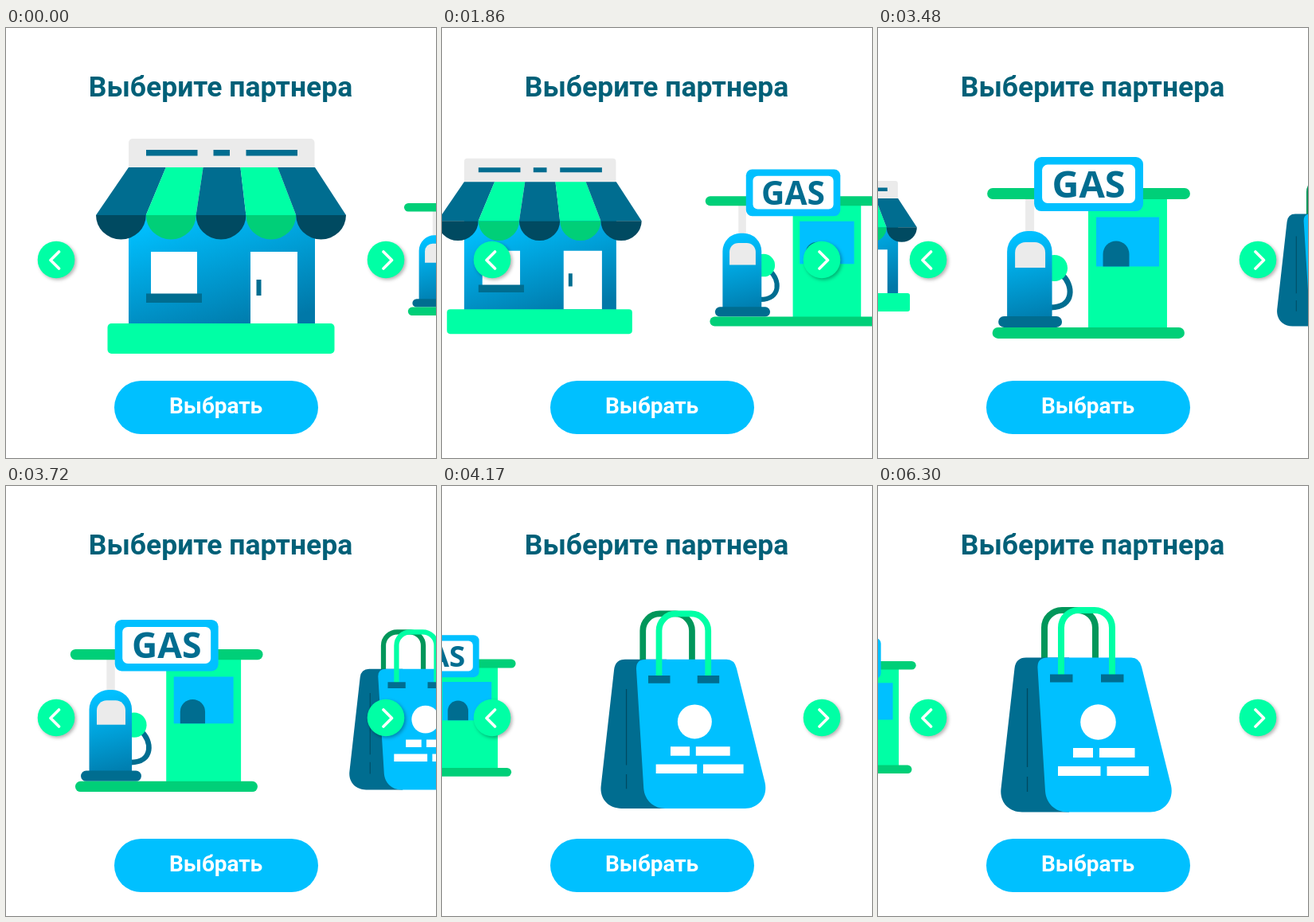
An HTML page that plays this animation: 540 by 540 pixels, repeating every 7110 ms.

```html
<!DOCTYPE html>
<html lang="ru">
<head>
<meta charset="utf-8">
<style>
  html, body { margin: 0; width: 100%; height: 100%; overflow: hidden; background: #fff; }
  svg { display: block; width: 100%; height: 100%; }
  text { text-anchor: middle; font-weight: 700; font-family: Roboto, sans-serif; }
  .blue { fill: #00c0ff; }
  .navy { fill: #006d90; }
  .deep { fill: #004a61; }
  .mint { fill: #00ffa5; }
  .leaf { fill: #00cf78; }
  .pale { fill: #ebebeb; }
  .white { fill: #fff; }
  .line { fill: none; stroke-width: 8; }
  .arrow { filter: drop-shadow(2px 2px 2px rgba(0, 0, 0, .3)); }
  .chevron { fill: none; stroke: #fff; stroke-width: 3.6; stroke-linecap: round; stroke-linejoin: round; }
</style>
</head>
<body>
<svg viewBox="0 0 540 540">
  <defs>
    <linearGradient id="wall" gradientUnits="userSpaceOnUse" x1="240" y1="225" x2="290" y2="385">
      <stop stop-color="#00c0ff"/><stop offset="1" stop-color="#0078a8"/>
    </linearGradient>
    <linearGradient id="pump" gradientUnits="userSpaceOnUse" x1="180" y1="262" x2="205" y2="372">
      <stop stop-color="#00c0ff"/><stop offset="1" stop-color="#0078a8"/>
    </linearGradient>
  </defs>

  <text x="269.5" y="86" font-size="35.5" fill="#006078">Выберите партнера</text>

  <g id="shop">
    <path class="pale" d="M154 178V144a5 5 0 0 1 5-5H382.500a5 5 0 0 1 5 5V178z"/>
    <path class="navy" d="M176 153h64.500v7.500H176zM260.500 153H281v7.500H260.500zM301.500 153H366v7.500H301.500z"/>
    <path fill="url(#wall)" d="M154 234H388V372H154z"/>
    <path class="white" d="M182 281h58v53h-58zM307 281h59v90h-59z"/>
    <path class="navy" d="M176 333.500h70V345h-70zM314.500 316h6v20h-6z"/>
    <g id="awning"></g>
    <rect class="mint" x="127.500" y="371" width="285" height="38" rx="5"/>
  </g>

  <g id="gas">
    <rect class="pale" x="185" y="210" width="11" height="50"/>
    <rect class="mint" x="264" y="208" width="99" height="170"/>
    <rect class="leaf" x="137" y="201" width="255" height="14" rx="7"/>
    <rect class="blue" x="274" y="237.500" width="79" height="62"/>
    <path class="navy" d="M282.500 299.500V284a16.500 16.500 0 0 1 33 0v15.500z"/>
    <path class="line" stroke="#006d90" style="stroke-width:7" d="M230 309C246 322 247 351 217 351"/>
    <circle class="mint" cx="221.500" cy="301.500" r="16.500"/>
    <path fill="url(#pump)" d="M162 364V281a26 26 0 0 1 26-26h4.500a26 26 0 0 1 26 26v83z"/>
    <path class="pale" d="M172 301V282a13 13 0 0 1 13-13h12a13 13 0 0 1 13 13v19z"/>
    <rect class="navy" x="151" y="362" width="80" height="14" rx="7"/>
    <rect class="leaf" x="143.500" y="376" width="241.500" height="14" rx="7"/>
    <rect class="blue" x="196" y="162" width="137" height="68" rx="9"/>
    <rect class="white" x="206" y="171.500" width="117" height="48.500" rx="7"/>
    <text class="navy" x="264.500" y="213" font-size="47" style="font-family:'Noto Sans',sans-serif">GAS</text>
  </g>

  <g id="bag">
    <path class="line" stroke="#00965a" d="M209 218V178a22 22 0 0 1 22-22h20a22 22 0 0 1 22 22V218"/>
    <path class="navy" d="M186 215.500Q173 215.500 171.500 229L154.500 380C152.500 397 164 409.500 181 409.500H240V215.500z"/>
    <path class="deep" d="M186.900 254h1.300v99h-1.300zM186.900 365h1.300v19h-1.300z"/>
    <path class="blue" d="M213 215.500H318Q328 215.500 331 227L368 376C372 395 359 409.500 342 409.500H238C222 409.500 211 398 210 383L200.500 229Q199.500 215.500 213 215.500z"/>
    <path class="line" stroke="#00ffa5" d="M230 238V178a22 22 0 0 1 22-22h20a22 22 0 0 1 22 22V238"/>
    <path class="navy" d="M216 236.500h28.500v10H216zM280 236.500h28.500v10H280z"/>
    <circle class="white" cx="276.500" cy="296.500" r="22.300"/>
    <path class="white" d="M245 329h25v12h-25zM278 329h44.500v12H278zM226 352h53.500v12H226zM287.500 352H340v12h-52.500z"/>
  </g>

  <circle class="mint arrow" cx="63" cy="291" r="23.300"/>
  <circle class="mint arrow" cx="477" cy="291" r="23.300"/>
  <path class="chevron" d="M66.500 281L56 291.500L66.500 302M474 281L484.500 291.500L474 302"/>

  <rect class="blue" x="136" y="443" width="256" height="67" rx="33.500"/>
  <rect id="pressed" fill="#d8d8d8" x="136" y="443" width="256" height="67" rx="33.500"/>
  <text class="white" x="263.500" y="484" font-size="28">Выбрать</text>
</svg>

<script>
  const LOOP = 7110, TICK = 30;
  const byId = id => document.getElementById(id);

  // Five awning stripes, each ending in a half-ellipse
  byId('awning').innerHTML = [0, 1, 2, 3, 4].map(i => {
    const top = 154 + 46.8 * i, low = 113 + 62.8 * i;
    const [stripe, scallop] = i % 2 ? ['mint', 'leaf'] : ['navy', 'deep'];
    return `<path class="${stripe}" d="M${top} 175h46.8L${low + 62.8} 235H${low}z"/>
      <path class="${scallop}" d="M${low} 235a31.4 30.5 0 0 0 62.8 0z"/>`;
  }).join('');

  // cx, cy: pivot; x, scale: values at the three carousel stops
  const items = [
    { id: 'shop', cx: 270, cy: 274, x: [270, -45.5, -360], scale: [1, .607, .607] },
    { id: 'gas', cx: 264.4, cy: 276, x: [595, 265.4, -47.5], scale: [.746, 1, .746] },
    { id: 'bag', cx: 261.5, cy: 281, x: [900, 580, 261.5], scale: [.726, .726, 1] }
  ];

  function ease(time, start, duration) {
    const u = Math.min(1, Math.max(0, (time - start) / duration));
    return u * u * (3 - 2 * u);
  }

  function mix(stops, position) {
    const i = Math.min(1, Math.floor(position));
    return stops[i] + (stops[i + 1] - stops[i]) * (position - i);
  }

  function draw() {
    const time = Math.floor(performance.now() % LOOP / TICK) * TICK;
    const position = ease(time, 1530, 690) + ease(time, 3450, 930);
    for (const { id, cx, cy, x, scale } of items) {
      byId(id).setAttribute('transform',
        `translate(${mix(x, position)} ${cy}) scale(${mix(scale, position)}) translate(${-cx} ${-cy})`);
    }
    byId('pressed').style.display = time >= 4890 && time < 6300 ? '' : 'none';
    requestAnimationFrame(draw);
  }
  draw();
</script>
</body>
</html>
```
